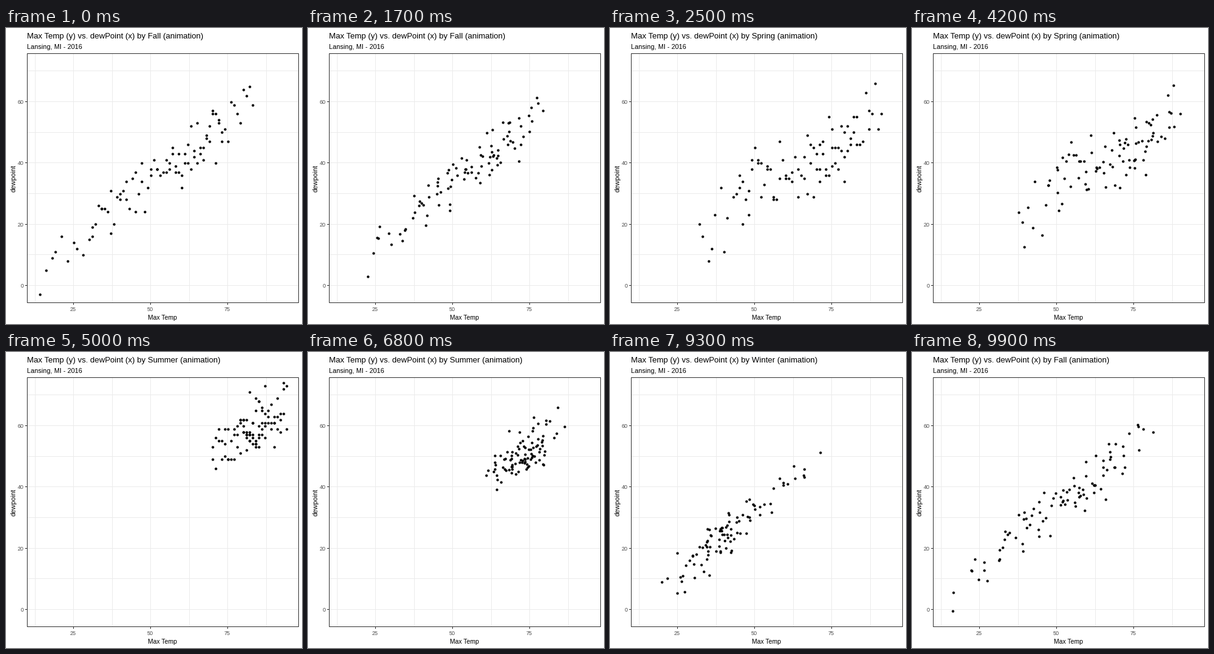
Write a matplotlib script that moves like this. It is 480 px wide and 480 px high and loops after 10 s.

```python
import matplotlib.pyplot as plt
import numpy as np
from matplotlib.animation import FuncAnimation
from matplotlib.patches import Rectangle

SIZE, DPI = 480, 80
PX = 72 / DPI  # points per pixel
DAYS = 91
CYCLE, HOLD, STEPS = 25, 16, 9  # frames per season, last still frame, tween steps
LEFT, RIGHT, TOP, BOTTOM = 34, 474, 41, 445
INK, GRID, LABEL = "#333333", "#ebebeb", "#4d4d4d"
QUANTILES = [0, 0.1, 0.25, 0.5, 0.75, 0.9, 1]

rng = np.random.default_rng(16)


def season(temps, dews, spread, trend):
    """Whole-degree readings along a quantile curve, ordered by day.

    A trend of 1 warms through the season, -1 cools, 0 is unordered.
    """
    q = np.linspace(0, 1, DAYS)
    temp = np.interp(q, QUANTILES, temps)
    noise = np.clip(rng.normal(0, spread, DAYS), -2 * spread, 2 * spread)
    dew = np.interp(temp, temps, dews) + noise
    order = np.argsort(trend * temp + rng.normal(0, 9, DAYS))
    return np.column_stack([temp, dew]).round()[order]


# Temperatures at the quantiles, typical dew points there, spread, trend
names = ["Fall", "Spring", "Summer", "Winter"]
seasons = [
    season([14, 30, 40, 56, 67, 74, 83], [0, 18, 29, 37, 46, 52, 61], 4.5, -1),
    season([32, 44, 52, 67, 77, 83, 91], [16, 28, 33, 38, 44, 54, 59], 6.5, 1),
    season([70, 74, 79, 83, 87, 91, 94], [52, 53, 57, 60, 62, 64, 65], 5.5, 0),
    season([15, 23, 29, 38, 44, 56, 70], [1, 8, 16, 21, 26, 37, 49], 4.5, 0),
]


def to_x(temp):
    return 109.5 + 5 * (temp - 25)


def to_y(dew):
    return 417.5 - 4.965 * dew


def pixel(value):
    return np.floor(value) + 0.5


plt.rcParams["font.family"] = "Liberation Sans"
fig = plt.figure(figsize=(SIZE / DPI, SIZE / DPI), dpi=DPI, facecolor="white")
ax = fig.add_axes([0, 0, 1, 1])
ax.set(xlim=(0, SIZE), ylim=(SIZE, 0))
ax.axis("off")


def line(xs, ys, color):
    ax.plot(xs, ys, color=color, lw=PX, solid_capstyle="butt", snap=False, zorder=1)


def write(x, y, text, size, color="black", **kw):
    return ax.text(x, y, text, size=size * PX, color=color, va="baseline", **kw)


for temp in np.arange(12.5, 90, 12.5):
    line([pixel(to_x(temp))] * 2, [TOP, BOTTOM], GRID)
for dew in range(0, 80, 10):
    line([LEFT, RIGHT], [pixel(to_y(dew))] * 2, GRID)
for temp in (25, 50, 75):
    line([pixel(to_x(temp))] * 2, [BOTTOM, BOTTOM + 4], INK)
    write(to_x(temp) - 0.5, 459, str(temp), 9, LABEL, ha="center")
for dew in (0, 20, 40, 60):
    line([LEFT - 3, LEFT], [pixel(to_y(dew))] * 2, INK)
    write(29, to_y(dew) + 3.5, str(dew), 9, LABEL, ha="right")
ax.add_patch(Rectangle((LEFT + 0.5, TOP + 0.5), RIGHT - LEFT, BOTTOM - TOP,
                       fill=False, ec=INK, lw=PX, snap=False, zorder=4))

title = write(33.5, 17, "", 13.05)
write(33.5, 34, "Lansing, MI - 2016", 10.7)
write(253.5, 473, "Max Temp", 10.3, ha="center")
write(15, 244, "dewpoint", 11, ha="center", rotation=90, rotation_mode="anchor")
dots, = ax.plot([], [], "o", color="black", ms=4.2 * PX, mew=0, zorder=3)


def draw(frame):
    now, tick = divmod(frame, CYCLE)
    after = (now + 1) % len(seasons)
    t = max(0, tick - HOLD) / STEPS
    points = (1 - t) * seasons[now] + t * seasons[after]
    dots.set_data(to_x(points[:, 0]), to_y(points[:, 1]))
    name = names[after if t > 0.5 else now]
    title.set_text(f"Max Temp (y) vs. dewPoint (x) by {name} (animation)")
    return dots, title


anim = FuncAnimation(fig, draw, frames=CYCLE * len(seasons), interval=100,
                     repeat=True, repeat_delay=0)
plt.show()
```
